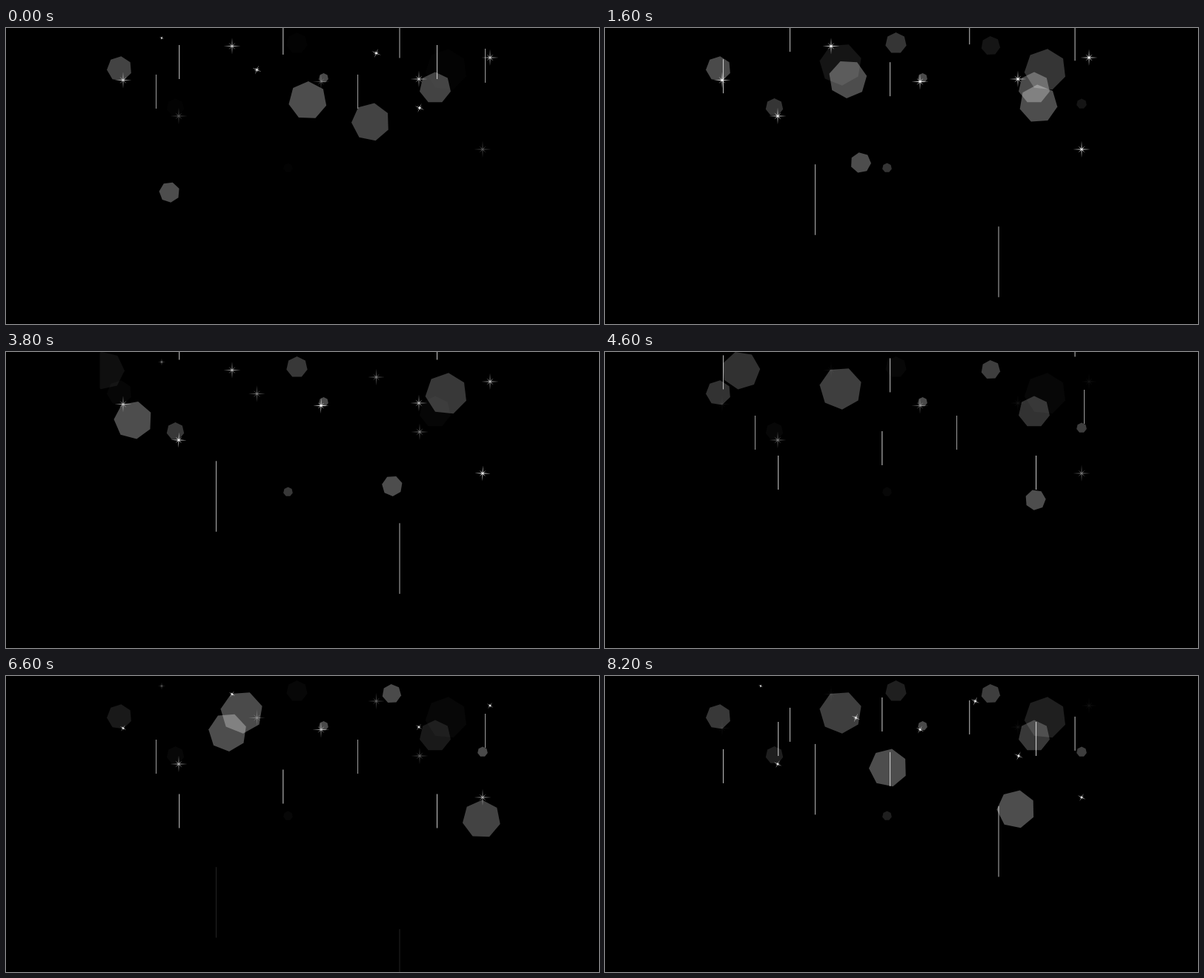
Animation of 800 by 400 pixels, one loop 8400 ms. Source, as an HTML page with a canvas:

```html
<!DOCTYPE html>
<html lang="en">
<head>
<meta charset="utf-8">
<title>Falling lights</title>
<style>
html, body { margin: 0; width: 100%; height: 100%; overflow: hidden; background: #000; }
canvas { display: block; }
</style>
</head>
<body>
<canvas id="stage" width="800" height="400"></canvas>
<script>
const ctx = document.getElementById('stage').getContext('2d');
const LOOP = 8400, STEP = 200;
const mod = (a, n) => ((a % n) + n) % n;
const clamp = v => Math.max(0, Math.min(1, v));

// Smooth curve through a few [time, x, y] points (Lagrange).
function curve(points, t) {
  let x = 0, y = 0;
  for (const p of points) {
    let w = 1;
    for (const q of points) if (q !== p) w *= (t - q[0]) / (p[0] - q[0]);
    x += w * p[1];
    y += w * p[2];
  }
  return [x, y];
}

// Still heptagons that swell at one rate and fade at another: x, y, radius, turn
const pulses = [
  { shift: -1, period: 21, rise: .027, end: 18.5,
    items: [[318, 49, 28.8, 22], [520.3, 24, 13, -3], [643, 102.5, 7, 0]] },
  { shift: 4.8, period: 15.8, rise: .055, end: 13,
    items: [[153, 55, 17, 8], [579, 81, 21.5, 0]] },
  { shift: -2, period: 24, rise: .013, end: 22.2,
    items: [[392.5, 20.5, 14.5, 0], [594, 56.5, 28.5, 6], [228.5, 107, 12, 0], [380.5, 189, 6.5, 0]] },
  { shift: 99, period: 1e4, rise: 1, end: 1e4, items: [[428.5, 67.5, 6.5, 0]] }
];

// Drifting heptagons: turn = angle + spin * time
const drifters = [
  { r: 14, from: -20, to: 70, angle: 18, spin: 1.3,
    path: [[0, 220.5, 222], [18, 345, 182], [43, 521, 181], [61, 636.5, 230.5]] },
  { r: 26, from: -20, to: 56, angle: 2, spin: 1.5,
    path: [[0, 407, 98], [18, 327.5, 69], [27, 284, 57], [43, 171.5, 92]] },
  { r: 26, from: -14, to: 45, angle: 11, spin: -.8, path: [[0, 492, 127], [27, 631, 90]] },
  { r: 26, from: 43, to: 99, angle: 63, spin: -.55,
    path: [[43, 134, 25], [61, 228.7, 37.8], [76, 299, 76], [94, 382, 124]] },
  { r: 26, from: 62, to: 99, angle: -40, spin: .55, path: [[76, 641.5, 193.5], [94, 554.5, 180]] }
];

// Rain: each group falls from y after waiting for hold, and is gone at end; lines are x, y offset
const rain = [
  { period: 36.5, shift: -10, hold: 0, y: -109, speed: 18.9, end: 24, len: 46, alpha: .7,
    lines: [[159, 0], [249, -56], [384, 4], [491.2, -66], [633.5, -44]] },
  { period: 23, shift: 5, hold: 0, y: -74.5, speed: 19.5, end: 22, len: 46, alpha: .75,
    lines: [[233.2, 0], [373.3, -33], [581, 0]] },
  { period: 24.5, shift: 0, hold: 1.8, y: 28.4, speed: 19.2, end: 17, len: 46, alpha: .58,
    lines: [[202, 0], [474, 0], [646, -35]] },
  { period: 27, shift: 0, hold: .5, y: -64.2, speed: 18.47, end: 23, len: 95.5, alpha: .65,
    lines: [[283, -84], [530.5, 0]] }
];

const sparkles = [
  { period: 21, shift: 10, items: [[158, 70.5], [305, 24.5], [557, 69], [653, 40]] },
  { period: 31.4, shift: 3, items: [[210, 13.5, .45], [338.5, 56.5], [499.5, 34], [558, 108]] },
  { period: 27, shift: 16.5, items: [[233, 119], [425, 72.5], [643, 164]] }
];

// Closed shape whose corners cycle through the given radii.
function shape(x, y, radii, count, deg, alpha) {
  if (alpha <= 0) return;
  ctx.globalAlpha = alpha;
  ctx.beginPath();
  for (let i = 0; i < count; i++) {
    const a = deg * Math.PI / 180 + i * 2 * Math.PI / count;
    const r = radii[i % radii.length];
    ctx.lineTo(x + r * Math.sin(a), y - r * Math.cos(a));
  }
  ctx.fill();
}

function drawPulses(g, t) {
  const age = mod(t + g.shift, g.period);
  const alpha = Math.min(.29, g.rise * age, .055 * (g.end - age));
  for (const [x, y, r, deg] of g.items) shape(x, y, [r], 7, deg, alpha);
}

function drawDrifter(d, t) {
  if (t < d.from || t > d.to) return;
  const [x, y] = curve(d.path, t);
  const alpha = Math.min(.3, .06 + (t - d.from) * .0145);
  shape(x, y, [d.r], 7, d.angle + d.spin * t, alpha);
}

function drawRain(g, t) {
  const age = Math.ceil(mod(t + g.shift, g.period));
  const y = g.y + g.speed * Math.max(g.hold, age);
  ctx.globalAlpha = g.alpha * clamp((g.end - age) / 5);
  for (const [x, dy] of g.lines) ctx.fillRect(x, y + dy, 1.1, g.len);
}

function drawSparkles(g, t) {
  const age = mod(t + g.shift, g.period);
  const grow = clamp(age / 6);
  const turn = 60 * (1 - grow) ** 1.4;
  const alpha = clamp(1 - (age - 7) / 14);
  for (const [x, y, size = 1] of g.items) {
    const s = grow ** .75 * size;
    const inner = .5 + .7 * s;
    shape(x, y, [11.5 * s, inner, 6.3 * s, inner], 16, turn, alpha);
  }
}

// The beat count skips ahead by two late in the loop.
function beatAt(ms) {
  const k = Math.floor((ms % LOOP) / STEP);
  return Math.round(k * 2.25) + (k > 29 ? 2 : 0);
}

function draw(ms) {
  const t = beatAt(ms);
  ctx.globalAlpha = 1;
  ctx.fillStyle = '#000';
  ctx.fillRect(0, 0, 800, 400);
  ctx.fillStyle = '#fff';
  ctx.save();
  ctx.beginPath();
  ctx.rect(126.5, 0, 547.5, 400);
  ctx.clip();
  for (const g of pulses) drawPulses(g, t);
  for (const d of drifters) drawDrifter(d, t);
  for (const g of rain) drawRain(g, t);
  for (const g of sparkles) drawSparkles(g, t);
  ctx.restore();
}

const begin = performance.now();
function tick() {
  draw(performance.now() - begin);
  requestAnimationFrame(tick);
}
tick();
</script>
</body>
</html>
```
